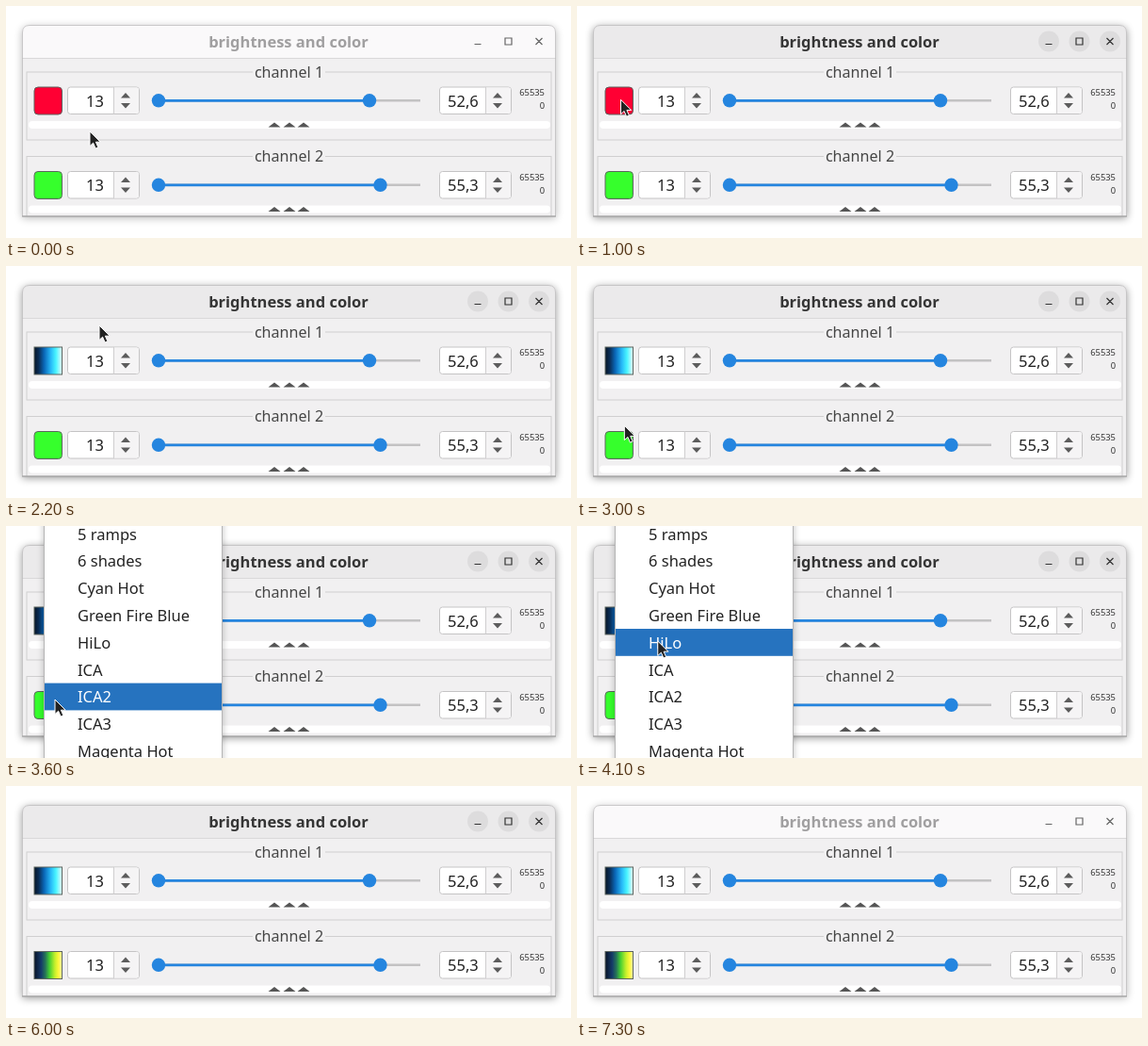
An HTML page that plays this animation: 600 by 246 pixels, repeating every 7400 ms.

```html
<!DOCTYPE html>
<html lang="en">
<head>
<meta charset="utf-8">
<title>brightness and color</title>
<style>
html, body { margin: 0; width: 100%; height: 100%; overflow: hidden; background: #fff; }
svg { display: block; width: 100%; height: 100%; font-family: "Noto Sans", "Open Sans", sans-serif; }
</style>
</head>
<body>
<svg id="stage" viewBox="0 0 600 246">
  <defs>
    <filter id="blur" x="-10%" y="-20%" width="120%" height="140%"><feGaussianBlur stdDeviation="4"/></filter>
    <clipPath id="frame"><path d="M17 223V28q0-8 8-8H576q8 0 8 8V223z"/></clipPath>
    <linearGradient id="cyanHot">
      <stop offset="0" stop-color="#081626"/><stop offset=".16" stop-color="#0a2c55"/>
      <stop offset=".36" stop-color="#0a68b8"/><stop offset=".6" stop-color="#28baf8"/>
      <stop offset=".78" stop-color="#48f4ff"/><stop offset="1" stop-color="#e8ffff"/>
    </linearGradient>
    <linearGradient id="greenFire">
      <stop offset="0" stop-color="#081226"/><stop offset=".25" stop-color="#153b69"/>
      <stop offset=".4" stop-color="#267557"/><stop offset=".55" stop-color="#45cf32"/>
      <stop offset=".75" stop-color="#c8f02c"/><stop offset=".88" stop-color="#fff83c"/>
      <stop offset="1" stop-color="#ffffb0"/>
    </linearGradient>
  </defs>
  <path id="shadow" d="M17 225V30q0-8 8-8H576q8 0 8 8V225z" filter="url(#blur)"/>
  <g clip-path="url(#frame)">
    <rect x="17" y="20" width="567" height="203" fill="#f1f0f1"/>
    <rect id="bar" x="17" y="20" width="567" height="35"/>
    <path d="M17 55.5H584" stroke="#d9d8d9"/>
    <text id="title" x="300" y="43.8" font-size="16.5" font-weight="700" text-anchor="middle">brightness and color</text>
    <g id="discs" fill="#dddcdd"><circle cx="501" cy="37.5" r="11"/><circle cx="533.5" cy="37.5" r="11"/><circle cx="566" cy="37.5" r="11"/></g>
    <path id="icons" d="M497.5 40.5h7M530 34h7v7h-7zM562.5 34l7 7m0-7l-7 7" fill="none" stroke-width="1.2"/>
    <g id="channels"></g>
  </g>
  <path d="M17.5 223V28q0-7.5 7.5-7.5H576q7.5 0 7.5 7.5V223z" fill="none" stroke="#bdbcbd" stroke-width=".8"/>
  <path d="M17 223H584" stroke="#999" stroke-width="1"/>
  <g id="menu">
    <rect x="0" y="-12" width="188" height="270" fill="#000" opacity=".3" filter="url(#blur)"/>
    <rect x="-.5" y="-5" width="189" height="256" fill="#fff" stroke="#b5b5b5"/>
    <rect id="mark" width="188" height="28.8" fill="#2673bf"/>
    <g id="rows" font-size="16.5"></g>
  </g>
  <path id="cursor" d="M0 0V15.5L3.6 12.2L6.1 18L8.9 16.8L6.4 11.2H11.2z" fill="#222" stroke="#fff" stroke-width="1" stroke-linejoin="round"/>
</svg>
<script>
const LOOP = 7400, STEP = 100, ROW = 28.8, FIRST_ROW = -6.2;
const ITEMS = ["5 ramps", "6 shades", "Cyan Hot", "Green Fire Blue", "HiLo", "ICA", "ICA2", "ICA3", "Magenta Hot"];
// Pointer stops: time, x, y
const PATH = [
  [0, 89, 133], [200, 89, 133], [900, 46, 100], [1300, 48, 97], [1700, 84, 78], [2000, 98, 65],
  [2200, 99, 63], [2500, 92, 80], [3100, 42, 187], [3400, 42, 187], [3600, 52, 184],
  [4000, 76, 132], [4400, 115, 92], [4700, 118, 85], [5000, 122, 83]
];
const MENUS = [{ from: 1200, to: 2100, x: 47 }, { from: 3400, to: 4500, x: 41 }];
const $ = id => document.getElementById(id);
const set = (el, attrs) => { for (const k in attrs) el.setAttribute(k, attrs[k]); };
const show = (el, on) => set(el, { visibility: on ? "visible" : "hidden" });

function spinBox(x, text, textX) {
  const ax = x + 62;
  return `<rect x="${x + .5}" y="86" width="76" height="28.5" rx="3" fill="#fff" stroke="#c5c4c5"/>
    <path d="M${x + 50} 86.5h24q2 0 2 2v23.5q0 2-2 2h-24z" fill="#f5f4f5"/>
    <path d="M${x + 49.5} 86v28.5" stroke="#cfcecf"/>
    <path d="M${ax - 5} 97.5l5-5.5l5 5.5zM${ax - 5} 103l5 5.5l5-5.5z" fill="#5c5c5c"/>
    <svg x="${x}" y="86" width="42" height="29"><text x="${textX - x}" y="20.5" font-size="16.5" fill="#222">${text}</text></svg>`;
}

function channel(i, high, value) {
  const triangles = [285, 301, 316].map(x => `M${x - 6.5} 128.5l6.5-5l6.5 5z`).join("");
  return `<g transform="translate(0 ${i * 89.5})">
    <rect x="22" y="70" width="557" height="72" fill="none" stroke="#d0cfd0"/>
    <rect x="262" y="64" width="77" height="12" fill="#f1f0f1"/>
    <text x="300.5" y="75.8" font-size="16.1" text-anchor="middle" fill="#454545">channel ${i + 1}</text>
    <rect id="swatch${i}" x="30" y="86" width="29.5" height="29" stroke="#5c645f"/>
    ${spinBox(65, "13", 85)}
    <path d="M162 100.3H440" stroke="#c3c2c3" stroke-width="2.4"/>
    <path d="M162 100.3H${high}" stroke="#2585df" stroke-width="2.8"/>
    <circle cx="162" cy="100.3" r="7.2" fill="#2585df"/><circle cx="${high}" cy="100.3" r="7.2" fill="#2585df"/>
    ${spinBox(460, value, 469)}
    <g font-size="9.4" text-anchor="end" fill="#333"><text x="572" y="95">65535</text><text x="572" y="109.3">0</text></g>
    <rect x="24" y="122" width="554" height="8" rx="4" fill="#fff"/>
    <path d="${triangles}" fill="#555"/></g>`;
}

$("channels").innerHTML = channel(0, 386, "52,6") + channel(1, 397.5, "55,3");
$("rows").innerHTML = ITEMS.map((name, i) => `<text x="35" y="${14.5 + i * ROW}">${name}</text>`).join("");
const rows = [...$("rows").children];

function pointer(t) {
  const i = PATH.findIndex(p => p[0] > t);
  if (i < 0) return PATH[PATH.length - 1].slice(1);
  const [t0, x0, y0] = PATH[i - 1], [t1, x1, y1] = PATH[i];
  const u = (t - t0) / (t1 - t0);
  return [x0 + (x1 - x0) * u, y0 + (y1 - y0) * u];
}

function swatch(i, picked, plain, gradient) {
  set($("swatch" + i), { fill: picked ? `url(#${gradient})` : plain, rx: picked ? 0 : 4 });
}

function draw(t) {
  const active = t >= 1000 && t < 6900;
  set($("shadow"), { fill: "#000", opacity: active ? .4 : .27 });
  set($("bar"), { fill: active ? "#ebeaeb" : "#faf9fa" });
  set($("title"), { fill: active ? "#353535" : "#a09fa0" });
  set($("icons"), { stroke: active ? "#333" : "#666" });
  show($("discs"), active);
  swatch(0, t >= MENUS[0].to, "#ff0033", "cyanHot");
  swatch(1, t >= MENUS[1].to, "#36ff2c", "greenFire");

  const menu = MENUS.find(m => t >= m.from && t < m.to);
  show($("menu"), menu);
  if (menu) {
    // The highlight trails the pointer by one step
    const hover = Math.floor((pointer(t - STEP)[1] - FIRST_ROW) / ROW);
    set($("menu"), { transform: `translate(${menu.x} 0)` });
    set($("mark"), { y: FIRST_ROW + hover * ROW });
    rows.forEach((row, i) => set(row, { fill: i === hover ? "#fff" : "#222" }));
  }
  show($("cursor"), t < 5100);
  set($("cursor"), { transform: `translate(${pointer(t).join(" ")})` });
}

const start = performance.now();
function tick() {
  const t = (performance.now() - start) % LOOP;
  draw(Math.floor(t / STEP) * STEP);
  requestAnimationFrame(tick);
}
tick();
</script>
</body>
</html>
```
